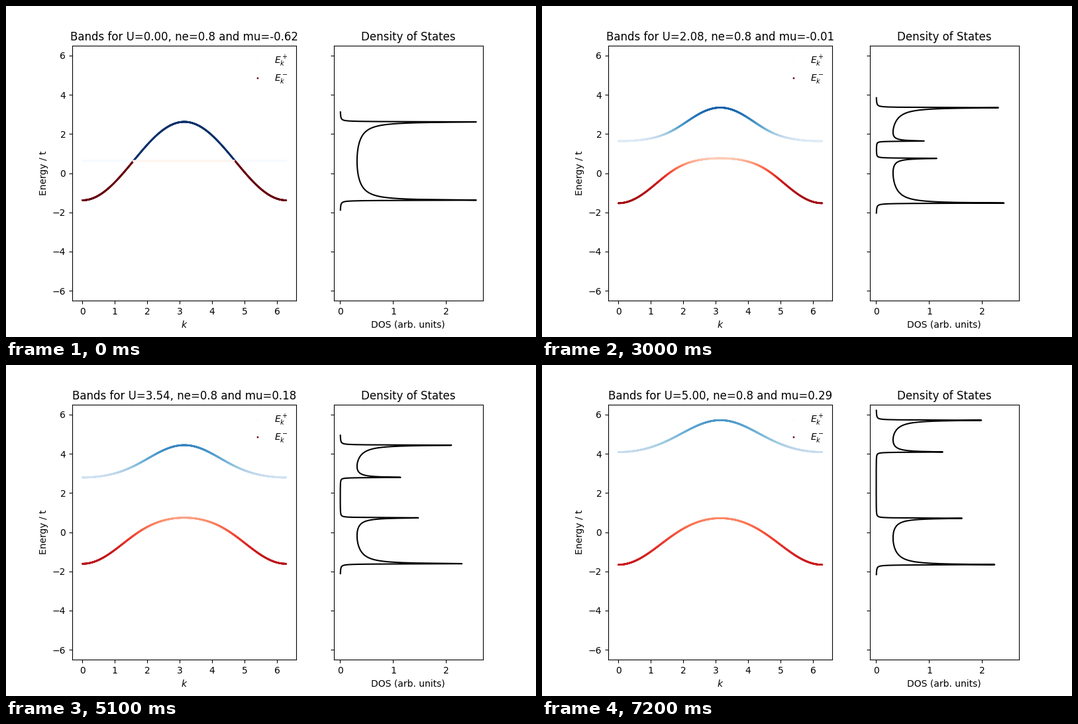
These frames come from a looping animation (800x500 px, 7500 ms). A matplotlib script:

```python
import numpy as np
import matplotlib.pyplot as plt
from matplotlib.animation import FuncAnimation

NE = 0.8            # electrons per site
N = NE / 2          # filling per spin
ETA = 0.01          # broadening
U_VALUES = np.linspace(0, 5, 25)

k = np.linspace(0, 2 * np.pi, 1000)
k_fine = (np.arange(20000) + 0.5) * np.pi / 20000


def bands(k, U):
    """Upper and lower Hubbard band with their spectral weights."""
    eps = -2 * np.cos(k)
    root = np.sqrt((U - eps) ** 2 + 4 * N * eps * U)
    upper = (U + eps + root) / 2
    lower = (U + eps - root) / 2
    w_upper = (upper - U * (1 - N)) / root
    return upper, lower, w_upper, 1 - w_upper


def chemical_potential(U):
    upper, lower, w_upper, w_lower = bands(k_fine, U)
    energy = np.concatenate([lower, upper])
    weight = np.concatenate([w_lower, w_upper]) / len(k_fine)
    order = np.argsort(energy)
    filling = np.cumsum(weight[order])
    return energy[order][np.searchsorted(filling, N)]


def density(omega, U):
    z = omega + 1j * ETA
    g = z * (z - U) / (z - U * (1 - N))
    green = 1 / (np.sqrt(g - 2) * np.sqrt(g + 2))
    return -2 / np.pi * green.imag


def state(i):
    U = U_VALUES[i]
    mu = chemical_potential(U)
    upper, lower, w_upper, w_lower = bands(k, U)
    omega = np.linspace(lower.min() - 0.5, upper.max() + 0.5, 2000)
    title = f"Bands for U={U:.2f}, ne={NE} and mu={mu:.2f}"
    return (title, upper - mu, lower - mu, w_upper, w_lower,
            density(omega, U), omega - mu)


fig, (ax, ax_dos) = plt.subplots(
    1, 2, sharey=True, figsize=(8, 5), dpi=100,
    gridspec_kw={"width_ratios": [1.5, 1]})

title, up, low, w_up, w_low, dos, energy = state(0)
style = dict(s=1, vmin=0, vmax=1)
dots_up = ax.scatter(k, up, c=w_up, cmap="Blues", label="$E_k^+$", **style)
dots_low = ax.scatter(k, low, c=w_low, cmap="Reds", label="$E_k^-$", **style)
line, = ax_dos.plot(dos, energy, "k")

ax.set(xlabel="$k$", ylabel="Energy / t", ylim=(-6.5, 6.5), title=title)
ax.set_xlim(-0.1 * np.pi, 2.1 * np.pi)
ax.legend(loc="upper right", frameon=False)
ax_dos.set(xlabel="DOS (arb. units)", title="Density of States")
ax_dos.set_xlim(ax_dos.get_xlim())


def update(i):
    title, up, low, w_up, w_low, dos, energy = state(i)
    ax.set_title(title)
    for dots, band, weight in ((dots_up, up, w_up), (dots_low, low, w_low)):
        dots.set_offsets(np.column_stack([k, band]))
        dots.set_array(weight)
    line.set_data(dos, energy)
    return dots_up, dots_low, line


anim = FuncAnimation(fig, update, frames=len(U_VALUES), interval=300,
                     repeat=True, repeat_delay=0)
plt.show()
```
